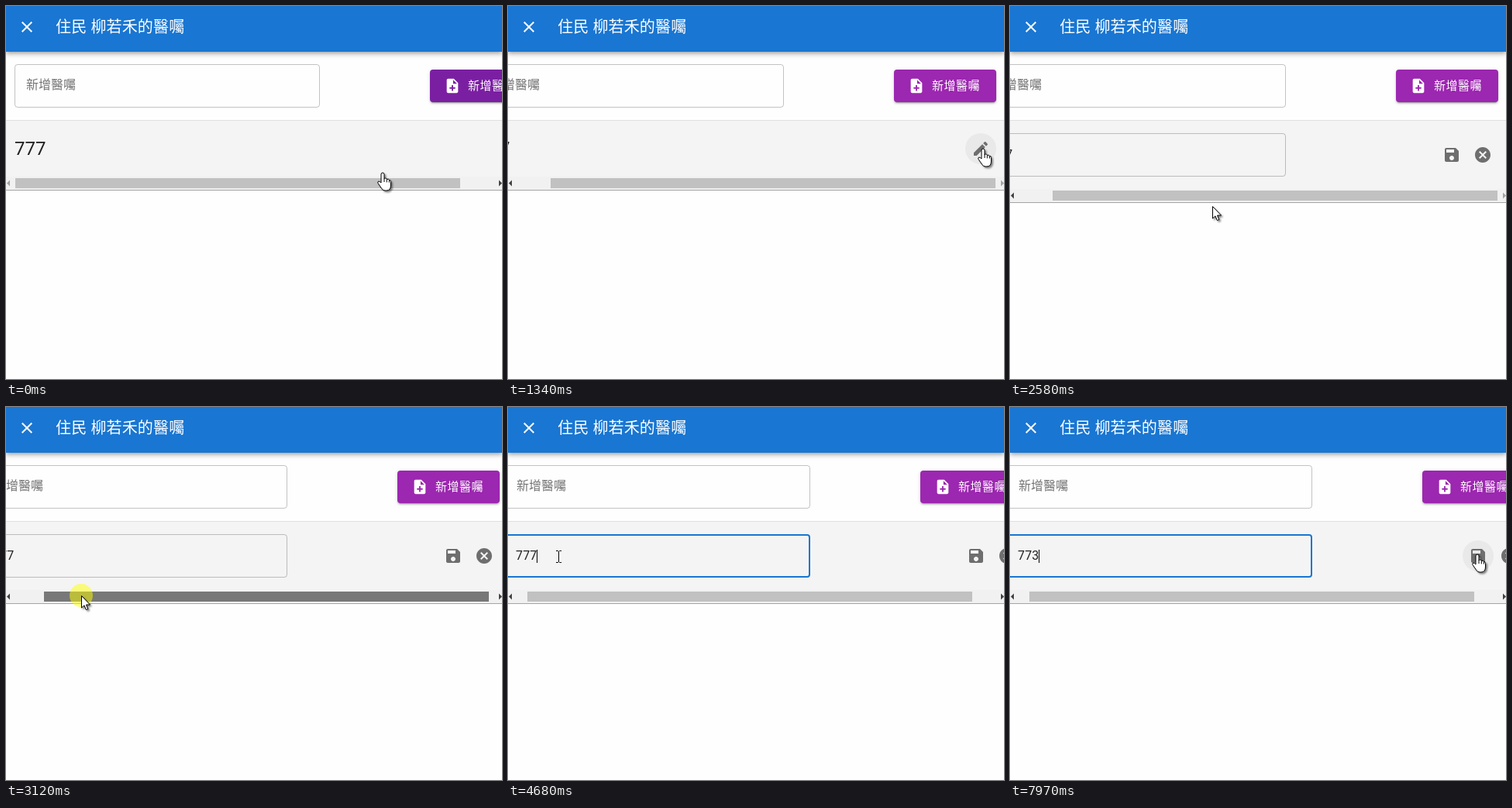
Write an HTML page that moves like this. It is 640x481 px and loops after 8000 ms.

```html
<!DOCTYPE html>
<html lang="zh-Hant">
<head>
<meta charset="utf-8">
<title>醫囑</title>
<style>
  html, body { margin: 0; width: 100%; height: 100%; overflow: hidden; background: #fefefe; }
  #stage { position: relative; width: 640px; height: 481px; overflow: hidden; background: #fefefe;
    font: 16px/24px Roboto, "Noto Sans CJK TC", "Noto Sans CJK", sans-serif; color: #212121; white-space: pre; }
  #stage * { position: absolute; box-sizing: border-box; }
  svg { overflow: visible; fill: currentColor; }
  header { left: 0; top: 0; width: 640px; height: 59px; background: #1976d2; color: #fff;
    box-shadow: 0 2px 4px -1px #0003, 0 4px 5px #0002, 0 1px 10px #0002; }
  header svg { left: 15px; top: 15px; }
  header span { left: 64px; top: 15px; font-size: 20px; letter-spacing: .15px; }
  #row { left: 0; top: 147px; width: 640px; border-top: 1px solid #e0e0e0; background: #f4f4f4; }
  #content, #view, #edit { left: 0; top: 0; width: 700px; }
  .field { left: 11px; width: 394px; height: 56px; border: 1px solid #0000003b; border-radius: 4px; }
  .field.hover { border-color: #212121; }
  .field.focus { border: 2px solid #1976d2; }
  #hint { left: 26px; top: 90px; color: #757575; }
  #add { left: 547px; top: 82px; width: 132px; height: 42px; border-radius: 4px; color: #fff;
    box-shadow: 0 3px 1px -2px #0003, 0 2px 2px #0002, 0 1px 5px #0002; }
  #add svg { left: 18px; top: 10px; }
  #add span { left: 49px; top: 9px; font-size: 15px; letter-spacing: .46px; }
  #title { left: 11px; top: 172px; font-size: 24px; }
  #value { left: 25px; top: 180px; letter-spacing: .15px; }
  #caret { top: 184px; width: 1px; height: 17px; background: #000; }
  .icon { width: 40px; height: 40px; color: #6e6e6e; }
  .icon i { inset: 0; border-radius: 50%; background: #0000000c; }
  .icon svg { left: 8px; top: 8px; }
  #bar { left: 0; top: 220px; width: 640px; height: 18px; background: #f1f1f1; border-bottom: 1px solid #a4a4a4; }
  #bar svg { left: 0; top: 0; }
  #thumb { top: 2px; width: 574px; height: 13px; }
  #tip { left: 591px; top: 226px; width: 38px; height: 25px; border-radius: 4px; background: #616161eb;
    color: #fff; font-size: 11px; line-height: 25px; text-align: center; }
  #popup { left: 97px; top: 230px; width: 153px; height: 43px; border-radius: 8px; background: #fff;
    filter: drop-shadow(0 1px 1.5px #0003); }
  #popup::before { content: ""; position: absolute; left: 9px; top: -7px;
    border: solid transparent; border-width: 0 11px 7px; border-bottom-color: #fff; }
  #popup span { left: 12px; top: 9px; font-size: 13px; font-weight: 700; color: #666; }
  #pointer { left: 0; top: 0; }
  #press { fill: #ff0; fill-opacity: .5; }
  #hand, #arrow { fill: #fff; stroke: #000; stroke-linejoin: round; filter: drop-shadow(2px 2px 1px #0007); }
  #beam { fill: none; stroke: #000; }
</style>
</head>
<body>
<div id="stage">
  <div id="row"></div>
  <div id="content">
    <div class="field" style="top:75px"></div>
    <span id="hint">新增醫囑</span>
    <div id="add">
      <svg width="22" height="22" viewBox="0 0 24 24"><path d="M14 2H6c-1.1 0-1.99.9-1.99 2L4 20c0 1.1.89 2 1.99 2H18c1.1 0 2-.9 2-2V8l-6-6zm2 14h-3v3h-2v-3H8v-2h3v-3h2v3h3v2zm-3-7V3.5L18.5 9H13z"/></svg>
      <span>新增醫囑</span>
    </div>
    <div id="view">
      <span id="title">777</span>
      <div class="icon" style="left:639px;top:164px"><i id="editHover"></i>
        <svg width="24" height="24"><path d="M3 17.25V21h3.75L17.81 9.94l-3.75-3.75L3 17.25zM20.71 7.04c.39-.39.39-1.02 0-1.41l-2.34-2.34c-.39-.39-1.02-.39-1.41 0l-1.83 1.83 3.75 3.75 1.83-1.83z"/></svg></div>
    </div>
    <div id="edit">
      <div id="input" class="field" style="top:164px"></div>
      <span id="value"></span>
      <div id="caret"></div>
      <div class="icon" style="left:599px;top:172px"><i id="saveHover"></i>
        <svg width="24" height="24"><path d="M17 3H5c-1.11 0-2 .9-2 2v14c0 1.1.89 2 2 2h14c1.1 0 2-.9 2-2V7l-4-4zm-5 16c-1.66 0-3-1.34-3-3s1.34-3 3-3 3 1.34 3 3-1.34 3-3 3zm3-10H5V5h10v4z"/></svg></div>
      <div class="icon" style="left:639px;top:172px"><i id="cancelHover"></i>
        <svg width="24" height="24"><path d="M12 2C6.47 2 2 6.47 2 12s4.47 10 10 10 10-4.47 10-10S17.53 2 12 2zm5 13.59L15.59 17 12 13.41 8.41 17 7 15.59 10.59 12 7 8.41 8.41 7 12 10.59 15.59 7 17 8.41 13.41 12 17 15.59z"/></svg></div>
    </div>
  </div>
  <div id="bar">
    <div id="thumb"></div>
    <svg width="640" height="17"><path id="toLeft" d="M1 8.5l4-4v8z"/><path id="toRight" d="M640 8.5l-4-4v8z"/></svg>
  </div>
  <div id="tip">取消</div>
  <div id="popup"><span>777</span></div>
  <header>
    <svg width="24" height="24"><path d="M19 6.41 17.59 5 12 10.59 6.41 5 5 6.41 10.59 12 5 17.59 6.41 19 12 13.41 17.59 19 19 17.59 13.41 12z"/></svg>
    <span>住民 柳若禾的醫囑</span>
  </header>
  <svg id="pointer" width="1" height="1">
    <circle id="press" r="15"/>
    <path id="arrow" d="M.5.5V16L4 12.8 6.3 18.5 8.8 17.5 6.5 12H11.5Z"/>
    <path id="hand" d="M-2 2Q-2 0 0 0Q2 0 2 2V8Q2 7 3.6 7Q5 7 5.3 8.4Q8 7.6 8.4 9.6Q10.5 9 10.5 11.5V16Q10.5 23 5 23H3Q0 23-1.5 20L-6 13.5Q-7 11.5-5 11Q-4 11-2 13ZM2 8v4M5.3 8.4v4M8.4 9.6v3"/>
    <path id="beam" d="M-3-7.5H-.5L.5-6.5 1.5-7.5H4M.5-7V7M-3 7.5H-.5L.5 6.5 1.5 7.5H4"/>
  </svg>
</div>
<script>
  const LOOP = 8000, MAX_THUMB = 43, MAX_SCROLL = 49;
  const el = Object.fromEntries([...document.querySelectorAll('[id]')].map(e => [e.id, e]));
  const clamp = (v, lo = 0, hi = 1) => Math.min(hi, Math.max(lo, v));
  const within = (t, from, to) => t >= from && t < to;
  const ramp = (t, from, to) => clamp((t - from) / (to - from));
  const fade = (t, inAt, outAt, inMs = 120, outMs = 150) =>
    ramp(t, inAt, inAt + inMs) * (1 - ramp(t, outAt, outAt + outMs));
  const show = (e, on) => e.style.display = on ? '' : 'none';

  // pointer route: time, x, y
  const route = [
    [0, 486, 215], [70, 486, 215], [220, 466, 262], [400, 422, 226], [430, 422, 224],
    [670, 461, 219], [790, 461, 219], [870, 576, 184], [1060, 576, 184], [1340, 613, 184],
    [1540, 613, 184], [1700, 611, 190], [1950, 574, 198], [2300, 575, 200], [2500, 400, 264],
    [2700, 57, 250], [2850, 103, 243], [2990, 103, 243], [3120, 97, 243], [3740, 77, 240],
    [3880, 73, 200], [4060, 73, 200], [4200, 63, 193], [4610, 63, 193], [4680, 65, 193],
    [6140, 65, 193], [7019, 126, 180], [7085, 126, 180], [7820, 600, 190], [7900, 607, 191],
    [7970, 603, 190], [LOOP, 603, 190]
  ];

  function pointerAt(t) {
    const i = route.findIndex(p => p[0] > t);
    const [a, b] = [route[i - 1], route[i]];
    const k = ramp(t, a[0], b[0]);
    return [a[1] + (b[1] - a[1]) * k, a[2] + (b[2] - a[2]) * k];
  }

  function thumbAt(t, x) {
    if (t < 430) return 0;
    if (t < 870) return clamp(x - 422, 0, MAX_THUMB);
    if (t < 2990) return MAX_THUMB;
    return t < 3880 ? MAX_THUMB + x - 103 : 13;
  }

  function draw(t) {
    const [x, y] = pointerAt(t);
    const editing = t >= 1600, focused = t >= 4200;
    const dragging = within(t, 430, 820) || within(t, 2990, 3860);
    const thumb = thumbAt(t, x);
    const drop = editing ? 16 : 0;

    el.content.style.transform = `translateX(${-Math.round(thumb * MAX_SCROLL / MAX_THUMB)}px)`;
    el.add.style.background = `color-mix(in srgb, #9c27b0 ${100 * ramp(t, 70, 320)}%, #7b1fa2)`;
    el.row.style.height = 73 + drop + 'px';
    el.bar.style.top = 220 + drop + 'px';
    el.thumb.style.left = 12 + Math.round(thumb) + 'px';
    const overBar = within(y, 222 + drop, 235 + drop);
    el.thumb.style.background = dragging ? '#787878' : overBar ? '#a8a8a8' : '#c1c1c1';
    el.toLeft.style.fill = thumb > 0 ? '#404040' : '#a3a3a3';
    el.toRight.style.fill = thumb < MAX_THUMB ? '#404040' : '#a3a3a3';

    show(el.view, !editing);
    show(el.edit, editing);
    el.editHover.style.opacity = fade(t, 1150, 1600);
    el.cancelHover.style.opacity = fade(t, 1600, 1990);
    el.saveHover.style.opacity = fade(t, 2000, 2330) + ramp(t, 7750, 7900);
    el.tip.style.opacity = fade(t, 1720, 2370);

    const inField = t >= 3870 && x < 390 && within(y, 164, 220) && !dragging;
    el.input.className = 'field' + (focused ? ' focus' : inField ? ' hover' : '');
    const text = t < 5610 ? '777' : t < 6490 ? '77' : '773';
    el.value.textContent = text;
    el.caret.style.left = 25 + Math.floor(text.length * 9.13) + 'px';
    show(el.caret, focused && !within(t, 5210, 5340) && !within(t, 6140, 6490) && !within(t, 7090, 7620));
    show(el.popup, within(t, 6140, 7090));
    el.popup.style.opacity = t < 6490 ? 1 : t < 6560 ? .8 : .6;

    const buttonsFrom = t > 7000 ? 584 : editing ? 550 : 590;
    const shape = inField ? 'beam' : t < 70 || (y < 212 && x >= buttonsFrom) ? 'hand' : 'arrow';
    for (const name of ['arrow', 'hand', 'beam']) show(el[name], name === shape);
    show(el.press, dragging || within(t, 1540, 1650) || within(t, 4200, 4340));
    show(el.pointer, !within(t, 6140, 7020));
    el.pointer.style.transform = `translate(${Math.round(x)}px, ${Math.round(y)}px)`;
  }

  const start = performance.now();
  function tick() {
    draw((performance.now() - start) % LOOP);
    requestAnimationFrame(tick);
  }
  tick();
</script>
</body>
</html>
```
